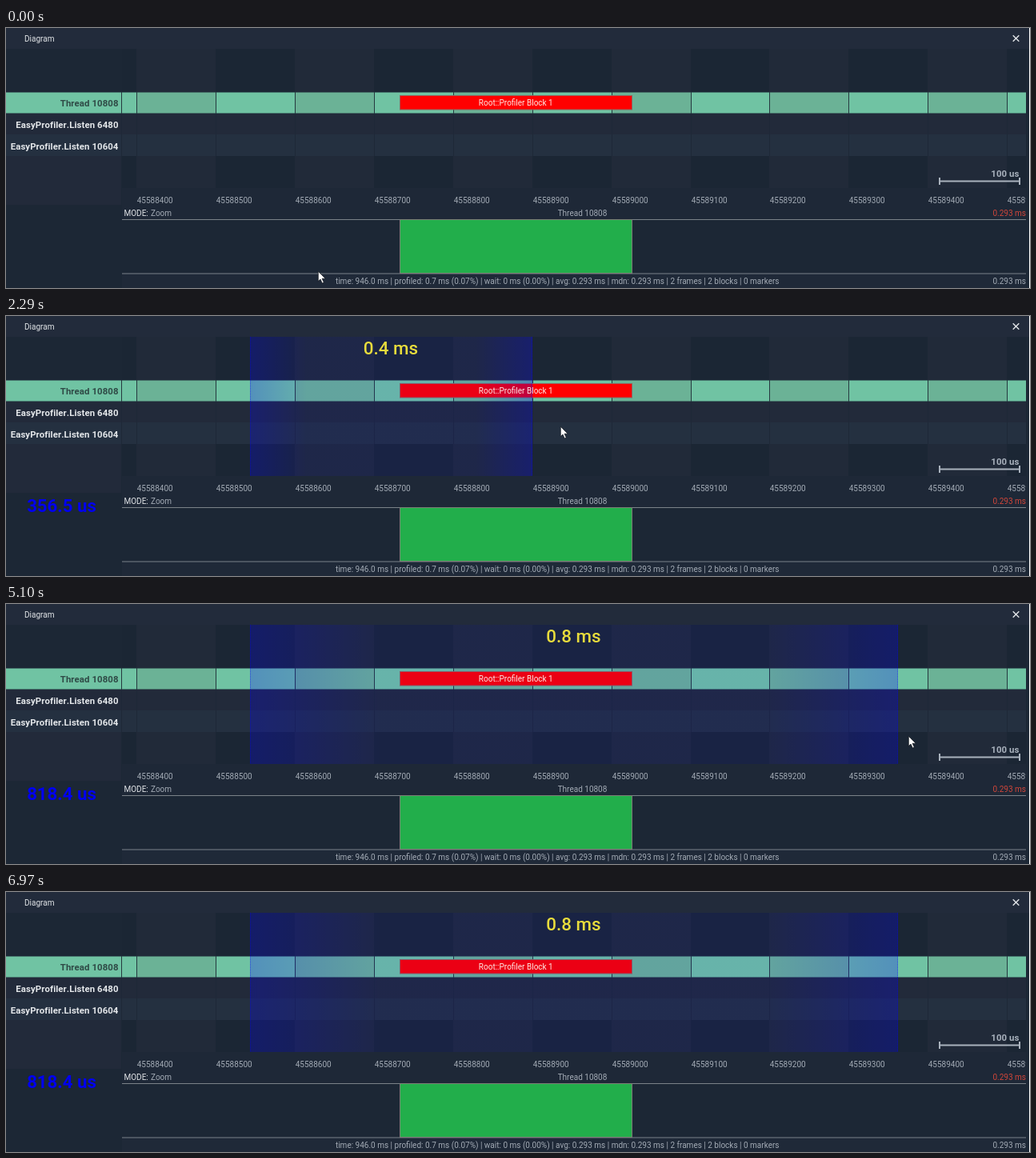
Animation of 1280x325 px, one loop 7.52 s. Source, as an HTML page:

```html
<!DOCTYPE html>
<html lang="en">
<head>
<meta charset="utf-8">
<title>Diagram</title>
<style>
  html, body { margin: 0; width: 100%; height: 100%; overflow: hidden; background: #1c2735; }
  svg { display: block; width: 1280px; height: 325px; }
  text { font: 10px Roboto, sans-serif; fill: #a3abb5; white-space: pre; }
  .bold { font-weight: 700; font-size: 11.4px; font-kerning: none; letter-spacing: .08px; fill: #e4e7ea; }
  .big { font-weight: 500; font-size: 22.4px; fill: #e8dc3c; }
  .blue { font-weight: 700; font-size: 22.2px; fill: #0000f0; }
  .bright { fill: #e2e5e8; }
  .mid { text-anchor: middle; }
  .end { text-anchor: end; }
</style>
</head>
<body>
<svg id="stage" viewBox="0 0 1280 325" xmlns="http://www.w3.org/2000/svg">
  <defs>
    <linearGradient id="fade">
      <stop offset="0" stop-color="#00f" stop-opacity=".26"/>
      <stop offset=".2" stop-color="#00f" stop-opacity=".08"/>
      <stop offset=".8" stop-color="#00f" stop-opacity=".08"/>
      <stop offset="1" stop-color="#00f" stop-opacity=".26"/>
    </linearGradient>
  </defs>
</svg>
<script>
const LOOP = 7520, STEP = 130;
const LEFT = 145, RIGHT = 1275, WIDTH = RIGHT - LEFT;
const PLOT_TOP = 239, PLOT_BOTTOM = 307;
const PX_PER_US = 0.98973;
const DRAG = { x: 305, from: 1510, to: 3100, lag: 42.4 };

// The screen refreshes in steps during these spans and rests between them.
const MOVES = [[810, 1360], [DRAG.from, DRAG.to], [5100, 6040], [6440, 6970]];

// Corners of the cursor's path: time, x, y
const PATH = [
  [740, 390, 304], [940, 368, 260], [1220, 335, 142], [1360, 305, 138],
  [1510, 305, 138], [1780, 368, 138], [2030, 480, 138], [2550, 905, 138],
  [2820, 1071, 138], [3050, 1115, 138], [4970, 1115, 138], [5620, 1180, 272],
  [5890, 1186, 292], [6310, 1189, 294], [6830, 1223, 321], [6960, 1230, 340]
];

const stage = document.getElementById("stage");

function set(el, attrs) {
  for (const key in attrs) el.setAttribute(key, attrs[key]);
}
function add(tag, attrs, parent = stage) {
  const el = document.createElementNS("http://www.w3.org/2000/svg", tag);
  set(el, attrs);
  parent.append(el);
  return el;
}
function box(x, y, width, height, fill, more = {}, parent = stage) {
  return add("rect", { x, y, width, height, fill, ...more }, parent);
}
function label(x, y, str, style = "", parent = stage) {
  const el = add("text", { x, y, class: style }, parent);
  el.textContent = str;
  return el;
}
function show(el, on) {
  el.style.display = on ? "" : "none";
}

// Panels
box(0, 0, 1280, 26, "#222b3b");
box(0, 107, 144, 114, "#222a3a");
box(LEFT, 200, WIDTH, 39, "#1e2837");
box(LEFT, PLOT_BOTTOM, WIDTH, 18, "#1f2938");

// Columns, one per 100 us
const columns = [];
for (let i = -1; i < 12; i++) {
  const edge = n => Math.floor(163.2 + n * 100 * PX_PER_US);
  const x = Math.max(edge(i), LEFT);
  columns.push({ x, width: Math.min(edge(i + 1), RIGHT) - x, odd: i % 2 === 0 });
}
for (const { x, width, odd } of columns) box(x, 26, width, 174, odd ? "#212a39" : "#1b2634");

// Thread rows
box(0, 107, RIGHT, 26, "#222a3a");
box(0, 133, RIGHT, 27, "#243040");
box(0, 80.5, LEFT, 26, "#70c3a3");
for (const { x, width, odd } of columns) {
  const lineX = x === LEFT ? x - 1 : x;
  box(x, 80.5, width, 26, odd ? "#6bb296" : "#70c3a3");
  box(lineX, 80, 1, 27, "#25383f");
  box(lineX, 107, 1, 53, "#1e2837");
}
box(492.5, 84.5, 290, 17.5, "#f00", { stroke: "#96615c" });

// Selection
const selection = add("g", {});
const band = box(DRAG.x, 26, 0, 174, "url(#fade)", {}, selection);
const edges = [0, 1].map(() => add("line", {
  y1: 26, y2: 200, stroke: "#00f", "stroke-opacity": 0.5, "stroke-dasharray": "1 1"
}, selection));
const span = label(0, 48, "", "big mid", selection);
const total = label(69.5, 245, "", "blue mid", selection);

// Captions
label(23, 16.7, "Diagram", "bright");
add("path", { d: "M1258.7 9.2l7.6 7.6m0-7.6l-7.6 7.6", stroke: "#e2e5e8", "stroke-width": 1.4 });
["Thread 10808", "EasyProfiler.Listen 6480", "EasyProfiler.Listen 10604"].forEach((name, i) => {
  const el = label(140.5, 97.6 + 27 * i, name, "bold end");
  if (i === 0) el.style.fill = "#2f4a46";
});
label(637.3, 97, "Root::Profiler Block 1", "mid").style.fill = "#ffe9e4";
columns.slice(1).forEach((c, i) => label(c.x + 0.7, 219.3, 45588400 + i * 100));

// Scale bar
label(1266.5, 185.5, "100 us", "bold end").style.fill = "#a9b2bd";
add("path", { d: "M1167 187v9M1267 187v9M1167 191.5h100", stroke: "#a9b2bd", "stroke-width": 2 });

// Plot
label(147.5, 234.8, "MODE:", "bright");
label(181, 234.8, "Zoom");
label(720.5, 234.8, "Thread 10808", "mid");
label(RIGHT, 234.8, "0.293 ms", "end").style.fill = "#d0463a";
for (const y of [PLOT_TOP, PLOT_BOTTOM - 0.5]) box(LEFT, y, WIDTH, 1, "#7b8289");
box(492.5, 239.5, 290, 67, "#22ae4b", { stroke: "#7c7f76" });
label(689.2, 319.6, [
  "time: 946.0 ms", "profiled: 0.7 ms (0.07%)", "wait: 0 ms (0.00%)", "avg: 0.293 ms",
  "mdn: 0.293 ms", "2 frames", "2 blocks", "0 markers"
].join(" | "), "mid");
label(RIGHT, 319.6, "0.293 ms", "end");

// Hover level, right margin, cursor
const level = add("g", {});
label(LEFT, 3.4, "0.293 ms", "bright", level);
box(188, -0.5, RIGHT - 188, 1, "#f4f6f6", {}, level);
box(RIGHT, 26, 5, 299, "#1c2735");
box(1279, 0, 1, 325, "#fff");
const cursor = add("path", {
  d: "M.3.3V12.6L3 10l2.3 5 2-.9L5.1 9.2H9.2Z",
  fill: "#fff", stroke: "#10151c", "stroke-width": 0.7
});

// Time of the last screen refresh
function refreshed(time) {
  const move = MOVES.findLast(([from]) => from <= time);
  if (!move) return 0;
  const [from, to] = move;
  return time >= to ? to : from + Math.floor((time - from) / STEP) * STEP;
}

function cursorAt(time) {
  const next = PATH.findIndex(([t]) => t > time);
  if (next === 0) return PATH[0].slice(1);
  if (next < 0) return PATH.at(-1).slice(1);
  const [t0, x0, y0] = PATH[next - 1];
  const [t1, x1, y1] = PATH[next];
  const k = (time - t0) / (t1 - t0);
  return [x0 + (x1 - x0) * k, y0 + (y1 - y0) * k];
}

function draw(time) {
  const now = refreshed(time);
  const [x, y] = cursorAt(now).map(Math.round);
  set(cursor, { transform: `translate(${x} ${y})` });

  show(level, now > 0 && y > PLOT_TOP && y < PLOT_BOTTOM);
  set(level, { transform: `translate(0 ${y})` });

  show(selection, now > DRAG.from);
  if (now <= DRAG.from) return;
  const [end] = cursorAt(Math.min(now, DRAG.to) - DRAG.lag);
  const us = (end - DRAG.x) / PX_PER_US;
  const right = Math.round(end);
  set(band, { width: right - DRAG.x });
  [DRAG.x + 0.5, right - 0.5].forEach((ex, i) => set(edges[i], { x1: ex, x2: ex }));
  set(span, { x: (DRAG.x + right) / 2 - 0.5 });
  span.textContent = (us / 1000).toFixed(1) + " ms";
  total.textContent = us.toFixed(1) + " us";
}

const begin = performance.now();
function tick() {
  draw((performance.now() - begin) % LOOP);
  requestAnimationFrame(tick);
}
tick();
</script>
</body>
</html>
```
